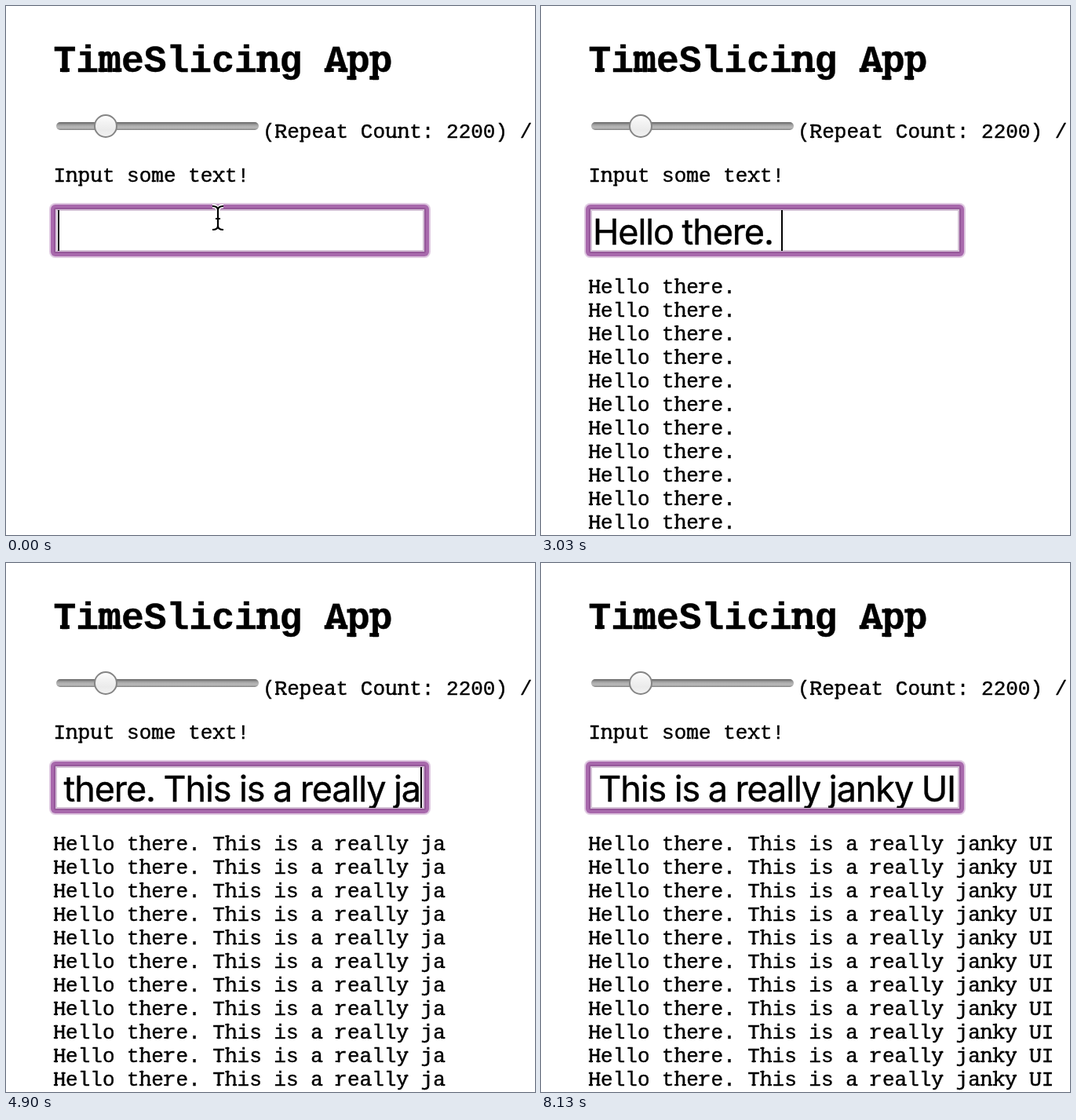
An HTML page with a canvas that plays this animation: 674 by 674 pixels, repeating every 8310 ms.

```html
<!DOCTYPE html>
<html lang="en">
<head>
<meta charset="utf-8">
<title>TimeSlicing App</title>
<style>
  html, body { margin: 0; width: 100%; height: 100%; overflow: hidden; background: #fff; }
  canvas { display: block; width: 674px; height: 674px; }
</style>
</head>
<body>
<canvas id="stage"></canvas>
<script>
const SIZE = 674, LOOP = 8310, BLINK = 500;
const MONO = '"Liberation Mono", monospace';
const SANS = 'Inter, sans-serif';
const FIELD = { left: 66, right: 528, top: 260, bottom: 312 };

// Slab serifs that turn the mono face into a typewriter face.
// First letter: level in em (base, x-height, cap, ascender, descender); second: stem.
const LEVEL = { b: 0, x: 0.528, c: 0.659, a: 0.725, d: -0.207 };
const STEM = { l: 0.115, m: 0.3, r: 0.485 };
const SLABS = {
  A: 'bl br', H: 'bl br cl cr', R: 'bl br cl', T: 'bm', U: 'cl cr',
  a: 'br', h: 'bl br al', k: 'bl br al xr', m: 'bl br xl', n: 'bl br xl',
  p: 'xl dl', r: 'bl xl', u: 'xl br', x: 'bl br xl xr', y: 'xl xr'
};

// [time in ms, characters typed]
const KEYS = [
  [1570, 'H'], [1770, 'e'], [1870, 'l'], [1970, 'lo'], [2030, ' '],
  [2200, 't'], [2400, 'h'], [2470, 'er'], [2530, 'e'], [2700, '.'], [2770, ' '],
  [3070, 'T'], [3130, 'hi'], [3200, 's '], [3270, 'is'], [3330, ' '],
  [3470, 'a'], [3670, ' '],
  [4000, 'r'], [4070, 'e'], [4100, 'a'], [4170, 'l'], [4200, 'l'], [4270, 'y'], [4470, ' '],
  [4730, 'j'], [4870, 'a'], [5000, 'n'], [5130, 'k'], [5300, 'y'], [5370, ' '],
  [5970, 'U'], [6370, 'I']
];

// [start time, y of the mouse pointer]
const POINTER = [[0, 270], [30, 283], [70, 305], [100, 328]];
const POINTER_END = 130;

const canvas = document.getElementById('stage');
const ctx = canvas.getContext('2d');
const ratio = window.devicePixelRatio || 1;
canvas.width = canvas.height = Math.round(SIZE * ratio);
ctx.scale(ratio, ratio);

function box(x, y, w, h, r, fill) {
  ctx.beginPath();
  ctx.roundRect(x, y, w, h, r);
  ctx.fillStyle = fill;
  ctx.fill();
}

function vertical(y0, y1, ...colors) {
  const g = ctx.createLinearGradient(0, y0, 0, y1);
  colors.forEach((c, i) => g.addColorStop(i / (colors.length - 1), c));
  return g;
}

// Filled text with a hairline outline for a slightly heavier weight
function ink(text, x, y) {
  ctx.fillStyle = ctx.strokeStyle = '#000';
  ctx.lineWidth = 0.4;
  ctx.lineJoin = 'round';
  ctx.fillText(text, x, y);
  ctx.strokeText(text, x, y);
}

function typewriter(text, x, y, size, bold) {
  ctx.font = `${bold ? 'bold ' : ''}${size}px ${MONO}`;
  ink(text, x, y);
  const w = size * (bold ? 0.25 : 0.2);
  const h = size * (bold ? 0.1 : 0.075);
  [...text].forEach((char, i) => {
    if (!SLABS[char]) return;
    for (const [level, stem] of SLABS[char].split(' ')) {
      const cx = x + size * (0.6 * i + STEM[stem]);
      const top = y - size * LEVEL[level];
      ctx.fillRect(cx - w / 2, 'bd'.includes(level) ? top - h : top, w, h);
    }
  });
}

function drawSlider() {
  box(64, 148, 258, 10, 5, vertical(148, 158, '#606060', '#929292', '#b2b2b2', '#b6b6b6', '#808080'));
  ctx.beginPath();
  ctx.arc(127, 153, 14, 0, Math.PI * 2);
  ctx.fillStyle = vertical(139, 167, '#fff', '#f3f3f3', '#ebebeb', '#f2f2f2');
  ctx.fill();
  ctx.strokeStyle = '#858585';
  ctx.lineWidth = 2;
  ctx.stroke();
}

function drawField() {
  box(55, 251, 486, 70, 8, '#dfc9e1');
  box(57, 253, 482, 66, 6, '#a869ac');
  box(61, 257, 474, 58, 2, '#96589a');
  box(63, 259, 470, 54, 0, '#d3c0d5');
  box(65, 261, 466, 50, 0, '#fff');
}

function drawInput(text, caretOn) {
  const { left, right, top, bottom } = FIELD;
  ctx.save();
  ctx.beginPath();
  ctx.rect(left, top, right + 2 - left, bottom - top);
  ctx.clip();
  ctx.letterSpacing = '-1.1px';
  ctx.wordSpacing = '-1px';
  ctx.font = '45px ' + SANS;
  const width = ctx.measureText(text).width;
  const scroll = Math.max(0, width - (right - left));
  ink(text, left - scroll, 304);
  if (caretOn) ctx.fillRect(Math.round(left + width - scroll), top, 2, bottom - top);
  ctx.restore();
}

function drawPointer(x, y) {
  ctx.beginPath();
  for (const s of [-1, 1]) {
    ctx.moveTo(x - 7, y + s * 15);
    ctx.quadraticCurveTo(x, y + s * 15, x, y + s * 10);
    ctx.quadraticCurveTo(x, y + s * 15, x + 7, y + s * 15);
  }
  ctx.moveTo(x, y - 11);
  ctx.lineTo(x, y + 11);
  ctx.moveTo(x - 3, y + 1);
  ctx.lineTo(x + 3, y + 1);
  for (const [color, width] of [['#fff', 5], ['#000', 2.2]]) {
    ctx.strokeStyle = color;
    ctx.lineWidth = width;
    ctx.stroke();
  }
}

function draw(t) {
  const typed = KEYS.filter(([at]) => at <= t);
  const text = typed.map(([, chars]) => chars).join('');
  const lastKey = typed.length ? typed[typed.length - 1][0] : -200;
  const caretOn = Math.floor((t - lastKey) / BLINK) % 2 === 0;

  ctx.fillStyle = '#fff';
  ctx.fillRect(0, 0, SIZE, SIZE);
  typewriter('TimeSlicing App', 60.5, 84, 48, true);
  drawSlider();
  typewriter('(Repeat Count: 2200) /', 327, 168, 26);
  typewriter('Input some text!', 60.5, 224, 26);
  drawField();
  drawInput(text, caretOn);
  for (let i = 0; i < 11; i++) typewriter(text, 60.5, 366 + i * 30, 26);

  if (t < POINTER_END) {
    const [, y] = POINTER.filter(([at]) => at <= t).pop();
    drawPointer(270, y);
  }
}

const start = performance.now();
function tick() {
  draw((performance.now() - start) % LOOP);
  requestAnimationFrame(tick);
}
tick();
</script>
</body>
</html>
```
